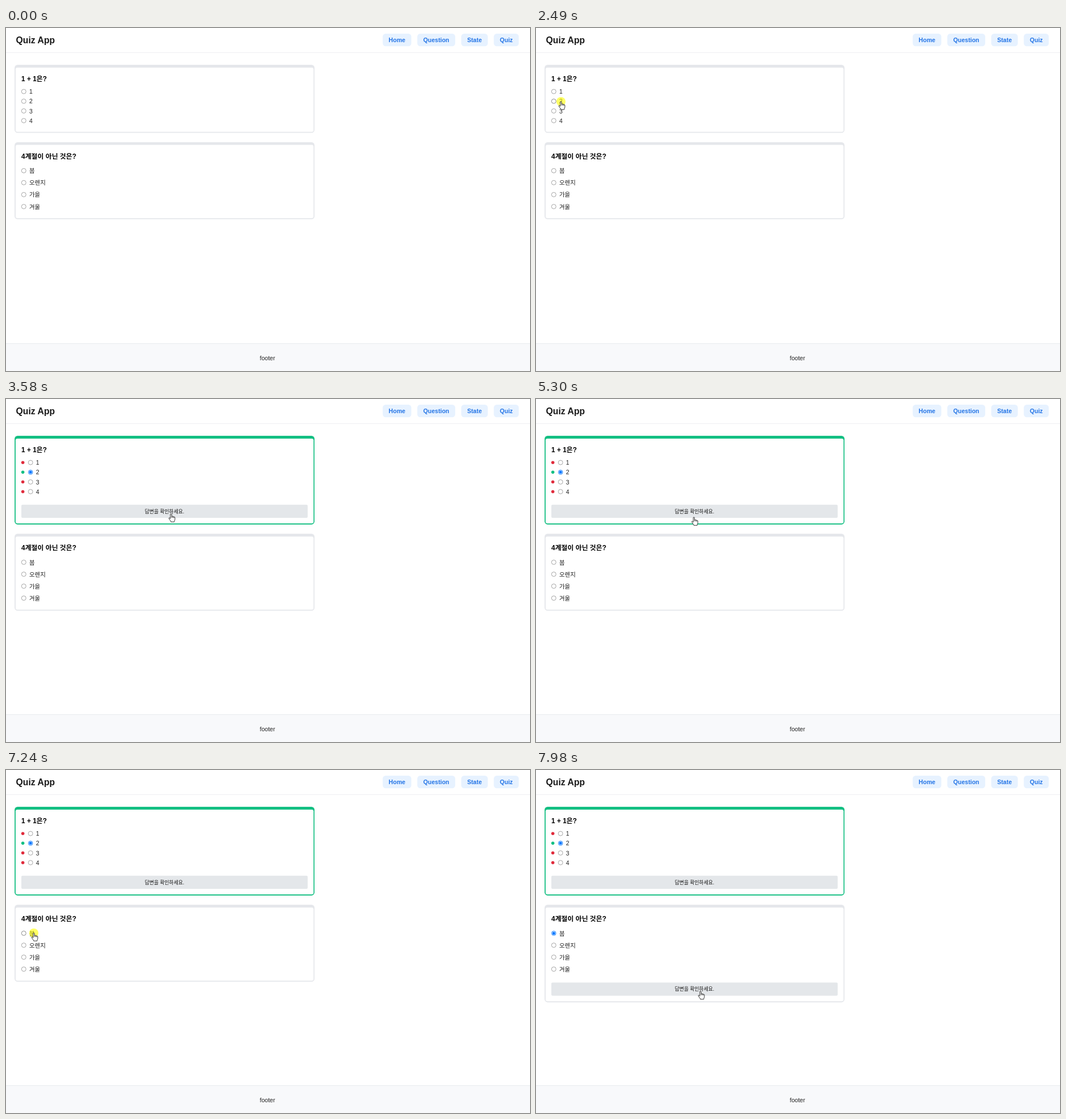
An HTML page that plays this animation: 924 by 606 pixels, repeating every 8000 ms.

```html
<!DOCTYPE html>
<html lang="ko">
<head>
<meta charset="utf-8">
<title>Quiz App</title>
<style>
html, body { margin: 0; width: 100%; height: 100%; overflow: hidden; background: #fff; }
svg { display: block; width: 924px; height: 606px; }
text { font: 16px "Liberation Sans", Arial, "Noto Sans CJK KR", "Noto Sans CJK", sans-serif; fill: #222; }
.bold { font-weight: 700; }
.mid { text-anchor: middle; }
</style>
</head>
<body>
<svg viewBox="0 0 1400 918.18">
  <g id="page"></g>
  <g id="quiz"></g>
  <g id="pointer"></g>
</svg>
<script>
const LOOP = 8000, STEP = 68, CLICK = 130, SCALE = 0.66;
const GREEN = '#13bf82', RED = '#e02b3c', GREY = '#e5e7eb';
const $ = id => document.getElementById(id);

const rect = (x, y, w, h, fill, r = 0) =>
  `<rect x="${x}" y="${y}" width="${w}" height="${h}" rx="${r}" fill="${fill}"/>`;
const circle = (x, y, r, attrs) => `<circle cx="${x}" cy="${y}" r="${r}" ${attrs}/>`;
const text = (x, y, str, cls = '', style = '') =>
  `<text x="${x}" y="${y}" class="${cls}" style="${style}">${str}</text>`;

function page() {
  let out = rect(0, 65, 1400, 1, GREY) +
    text(26.4, 40.3, 'Quiz App', 'bold', 'font-size:24px;fill:#1a1a1a') +
    rect(0, 844, 1400, 75, '#f8f9fb') + rect(0, 844, 1400, 1, '#e3e6ea') +
    text(698.5, 890, 'footer', 'mid');
  let right = 1370;
  for (const [label, w] of [['Quiz', 66.7], ['State', 71.1], ['Question', 101.3], ['Home', 76.4]]) {
    out += rect(right - w, 15, w, 34, '#e7f2ff', 8) +
      text(right - w / 2, 37.2, label, 'bold mid', 'fill:#2374e6');
    right -= w + 16;
  }
  return out;
}

function radio(x, y, checked, hover) {
  if (!checked) return circle(x, y, 6, `fill="#fff" stroke="${hover ? '#4f4f4f' : '#767676'}"`);
  const blue = hover ? '#005cc8' : '#0075ff';
  return circle(x, y, 5.8, `fill="#fff" stroke="${blue}" stroke-width="1.4"`) +
    circle(x, y, 3.8, `fill="${blue}"`);
}

// Draws a card and reports whether the pointer is over one of its labels or its button
function card({ top, height, title, options, firstY, pitch, picked, answer = -1 }, [px, py]) {
  const open = picked >= 0, marked = answer >= 0;
  const full = height + (open ? 55 : 0), dx = marked ? 18 : 0;
  const over = (x, y, w, h) => px >= x && px < x + w && py >= y && py < y + h;
  let hot = false;
  let svg = rect(23, top - 0.5, 801.2, full + 1.3, marked ? GREEN : GREY, 8) +
    rect(25.7, top + 7, 796, full - 9, '#fff', 5) +
    text(41, top + 44, title, 'bold', 'font-size:18px;fill:#000');
  options.forEach((label, i) => {
    const y = top + firstY + i * pitch;
    const width = label > 0 ? 9 : label.length * 14.7;
    const hover = over(62 + dx, y - pitch * 0.35, width, pitch * 0.7);
    hot ||= hover;
    if (marked) svg += circle(45, y, 4.2, `fill="${i === answer ? GREEN : RED}"`);
    svg += radio(47.5 + dx, y, i === picked, hover) + text(62 + dx, y + 6.2, label);
  });
  if (open) {
    const y = top + full - 52;
    hot ||= over(41, y, 765, 35);
    svg += rect(41, y, 765, 35, '#e4e7ea', 3) +
      text(423.5, y + 22.5, '답변을 확인하세요.', 'mid', 'font-size:13.33px;fill:#111');
  }
  return { svg, hot };
}

// Pointer glides: start, end, destination
const origin = [735, 525];
const glides = [
  [180, 390, 671, 439], [580, 1280, 59, 136], [1350, 1350, 44, 120], [1410, 1880, 39, 129],
  [2080, 2220, 44, 130], [2880, 3170, 283, 211], [3240, 3310, 291, 203], [5300, 5710, 64, 315],
  [5850, 5980, 52, 310], [6910, 7110, 49, 288], [7570, 7980, 290, 391]
];
const clicks = [2490, 3450, 7240];

const ease = u => u * u * (3 - 2 * u);

function pointerAt(t) {
  let pos = origin;
  for (const [start, end, ...goal] of glides) {
    if (t < start) break;
    const steps = Math.round((end - start) / STEP) + 1;
    const step = Math.floor((t - start) / STEP + 0.1) + 1;
    const u = ease(Math.min(1, step / steps));
    pos = pos.map((v, k) => v + (goal[k] - v) * u);
  }
  return pos.map(v => v / SCALE);
}

const ARROW = 'M.5.5V17L4.3 13.4L7 19.2L9.4 18.1L6.8 12.4H12Z';
const HAND = 'M-1.7 1.2a1.7 1.7 0 0 1 3.4 0V6.5c1-.8 2.8-.6 3.2.7c1-.6 2.5-.3 2.9.9c1.3-.5 2.7.2 2.7 1.8' +
  'v4.5c0 2-.9 3-1.4 4.3l-.3 2.6H-.2l-.6-2c-1.2-1.8-3.6-4.2-4.8-7.2c-.6-1.6 1.2-2.4 2.3-1.2l1.6 1.8Z' +
  'M1.7 6.5v4M4.9 7.2v3.5M7.8 8.1v3';

function pointer(t, [x, y], hot) {
  if (t < glides[0][0]) return '';
  const pressed = clicks.some(c => t >= c && t < c + CLICK);
  return (pressed ? circle(x, y, 12.3, 'fill="#ff0" fill-opacity=".6"') : '') +
    `<path transform="translate(${x} ${y})" d="${hot ? HAND : ARROW}" fill="#fff" stroke="#000" stroke-width="1.2" stroke-linejoin="round"/>`;
}

const shown = {};
function show(id, markup) {
  if (shown[id] !== markup) $(id).innerHTML = shown[id] = markup;
}

function draw() {
  const t = performance.now() % LOOP;
  const pos = pointerAt(t);
  const done = clicks.filter(c => t >= c + CLICK).length;
  const cards = [
    card({
      top: 99, height: 181, title: '1 + 1은?', options: [1, 2, 3, 4], firstY: 71, pitch: 26,
      picked: done > 0 ? 1 : -1, answer: done > 1 ? 1 : -1
    }, pos),
    card({
      top: done > 0 ? 361 : 306, height: 205, title: '4계절이 아닌 것은?',
      options: ['봄', '오렌지', '가을', '겨울'], firstY: 76, pitch: 32,
      picked: done > 2 ? 0 : -1
    }, pos)
  ];
  show('quiz', cards.map(c => c.svg).join(''));
  show('pointer', pointer(t, pos, cards.some(c => c.hot)));
  requestAnimationFrame(draw);
}

show('page', page());
draw();
</script>
</body>
</html>
```
